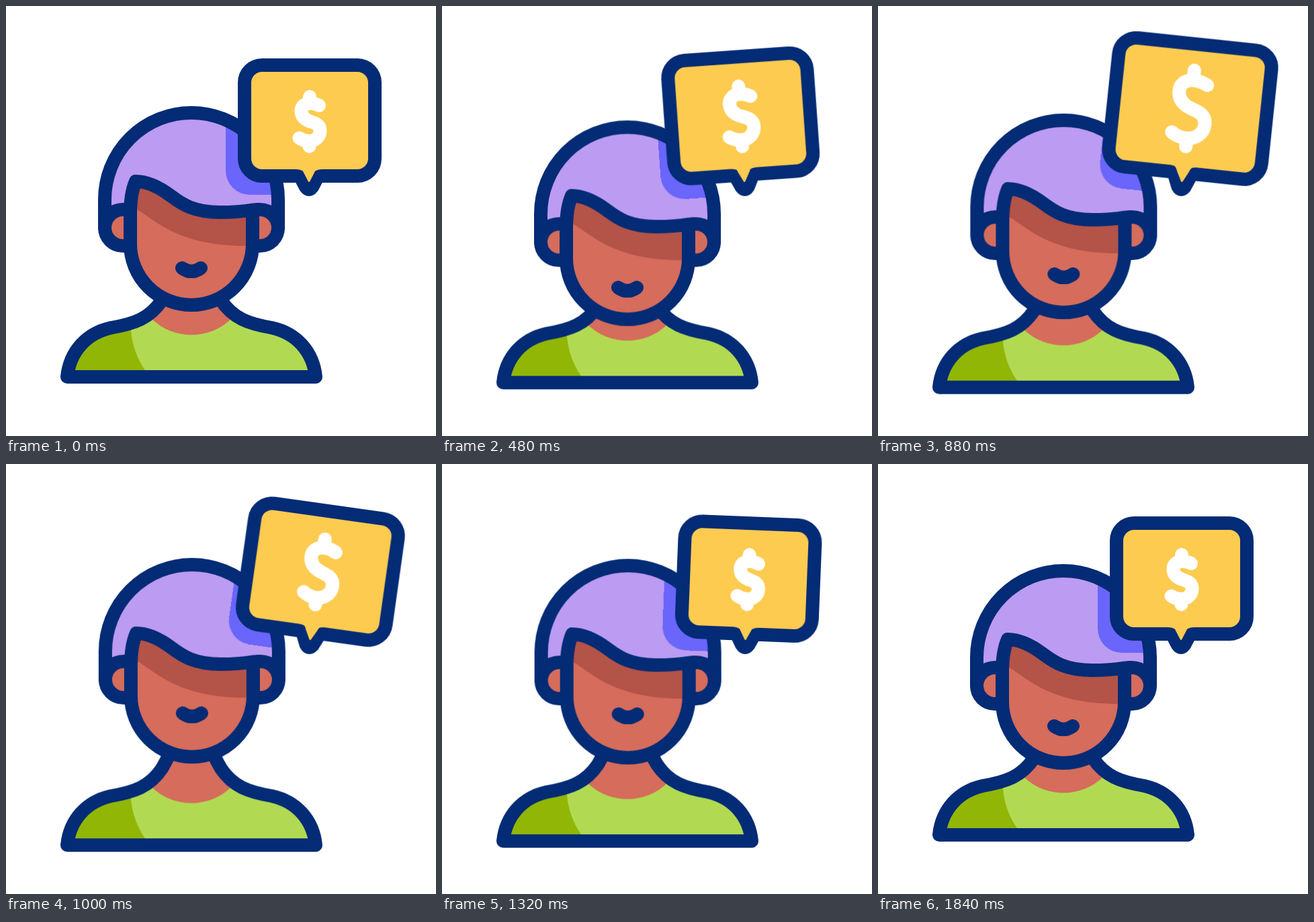
These frames come from a looping animation (640 by 640 pixels, 1.88 s). An HTML page:

```html
<!DOCTYPE html>
<html lang="en">
<head>
<meta charset="utf-8">
<title>Money talk</title>
<style>
  @property --angle { syntax: "<angle>"; inherits: false; initial-value: 0deg; }

  html, body { margin: 0; width: 100%; height: 100%; overflow: hidden; background: #fff; }
  svg { display: block; width: 100vw; height: 100vh; }

  .line { fill: none; stroke: #042b75; stroke-width: 20; stroke-linecap: round; stroke-linejoin: round; }
  .skin { fill: #d56c5c; }
  .shade { fill: #b45348; }
  .hair { fill: #bc9bf2; }
  .cast { fill: #6a65fb; }
  .shirt { fill: #b1da52; }
  .sleeve { fill: #91b605; }
  .card { fill: #fdcb50; }

  .head, .still, .body, .mouth, .tilt, .box, .coin {
    animation: 1880ms ease-in-out infinite;
  }
  .head { --way: 1; animation-name: nod; }
  .still { --way: -1; animation-name: nod; } /* cancels the nod inside the head */
  .body { animation-name: breathe; }
  .mouth { animation-name: chew; }
  .tilt { animation-name: tilt; transform: rotate(var(--angle)); transform-origin: 451px 273px; }
  .box { animation-name: grow; }
  .coin {
    animation-name: zoom;
    transform-origin: 451.5px 209.5px;
    stroke: #fff;
    vector-effect: non-scaling-stroke;
  }

  @keyframes nod {
    0%, 97.87%, 100% { transform: translate(0px, 0px); }
    39.36% { transform: translate(0px, calc(var(--way) * 28.7px)); }
    55.32% { transform: translate(calc(var(--way) * 0.9px), calc(var(--way) * -10.5px)); }
  }
  @keyframes breathe {
    0%, 4.26%, 97.87%, 100% { transform: translateY(0px); }
    44.68%, 47.87% { transform: translateY(15.6px); }
  }
  @keyframes chew {
    0%, 92.55%, 100% { transform: translateY(0px); }
    34.04% { transform: translateY(8.7px); }
    59.57% { transform: translateY(-12.7px); }
  }
  @keyframes tilt {
    0%, 17.02%, 76.6%, 100% { --angle: 0deg; }
    34.04% { --angle: -8deg; }
    51.06%, 59.57% { --angle: 8deg; }
  }
  @keyframes grow {
    0%, 17.55%, 65.96%, 100% {
      d: path("M381 88H523A26 26 0 0 1 549 114V227A26 26 0 0 1 523 253H471Q464 253 461.5 259L456 269.5Q451 276.5 446 269.5L440.5 259Q438 253 431 253H381A26 26 0 0 1 355 227V114A26 26 0 0 1 381 88Z");
    }
    36.7%, 42.55% {
      d: path("M362.5 53H541.5A26 26 0 0 1 567.5 79V222A26 26 0 0 1 541.5 248H471Q464 248 461.5 256L456 269.5Q451 276.5 446 269.5L440.5 256Q438 248 431 248H362.5A26 26 0 0 1 336.5 222V79A26 26 0 0 1 362.5 53Z");
    }
  }
  @keyframes zoom {
    0%, 17.55%, 65.96%, 100% { transform: scale(1); }
    36.7%, 42.55% { transform: scale(1.58); }
  }
</style>
</head>
<body>
<svg viewBox="0 0 640 640">
  <defs>
    <path id="torso" d="M91 552C95 514 120 487 156 479C191 473 214 465 232 438C237 430 240 424 244 414H308C312 424 315 430 320 438C338 465 361 473 396 479C432 487 457 514 461 552Z"/>
    <path id="dome" d="M147 330V288A129 129 0 0 1 405 288V330"/>
    <path id="face" d="M185 354V310C185 293 186 277 193 261C212 261 230 271 246 283C262 295 280 307 318 307C336 307 352 306 367 303.5V354A91 91 0 0 1 185 354Z"/>
    <path id="ear" d="M372 303H378A27 27 0 0 1 378 357H372"/>
    <clipPath id="inTorso"><use href="#torso"/></clipPath>
    <clipPath id="inHair"><path d="M147 310V288A129 129 0 0 1 405 288V310Z"/></clipPath>
    <clipPath id="inFace"><use href="#face"/></clipPath>
  </defs>

  <g class="body">
    <g clip-path="url(#inTorso)">
      <rect class="shirt" x="80" y="400" width="392" height="160"/>
      <path class="sleeve" d="M80 560V460H186V484C188 505 195 525 207 542V560Z"/>
      <path class="skin" d="M217 400V466C234 482 255 489.5 276 489.5S318 482 335 466V400Z"/>
    </g>
    <use href="#torso" class="line"/>
  </g>

  <g class="head">
    <g clip-path="url(#inHair)">
      <rect class="hair" x="140" y="150" width="270" height="165"/>
      <g class="still">
        <rect class="cast tilt" x="327" y="60" width="230" height="221" rx="36"/>
      </g>
    </g>
    <g class="skin">
      <use href="#ear"/>
      <use href="#ear" transform="matrix(-1 0 0 1 552 0)"/>
      <use href="#face"/>
    </g>
    <path class="shade" clip-path="url(#inFace)" d="M185 296L195 303C222 318 255 357 357 357H367V250H185Z"/>
    <g class="line">
      <use href="#dome"/>
      <use href="#ear"/>
      <use href="#ear" transform="matrix(-1 0 0 1 552 0)"/>
      <use href="#face"/>
      <path class="mouth" d="M262 390Q276 400 290 390"/>
    </g>
  </g>

  <g class="tilt">
    <path class="line box" style="fill: #fdcb50" d="M381 88H523A26 26 0 0 1 549 114V227A26 26 0 0 1 523 253H471Q464 253 461.5 259L456 269.5Q451 276.5 446 269.5L440.5 259Q438 253 431 253H381A26 26 0 0 1 355 227V114A26 26 0 0 1 381 88Z"/>
    <path class="card" d="M434 235Q440 240 442.5 247L449.5 260.5Q451 263.5 452.5 260.5L459.5 247Q462 240 468 235Z"/>
    <path class="line coin" d="M452 135V144.7M451.5 201V209M466 148C462 146 457 144.5 452 144.7C444 145 439.5 150 439.5 156C439.5 165 446 169.5 453 172C461 174.5 467.5 177 467.5 185.5C467.5 195 460 201 451 201C446 201 441 199.5 436.5 196.5"/>
  </g>
</svg>
</body>
</html>
```
